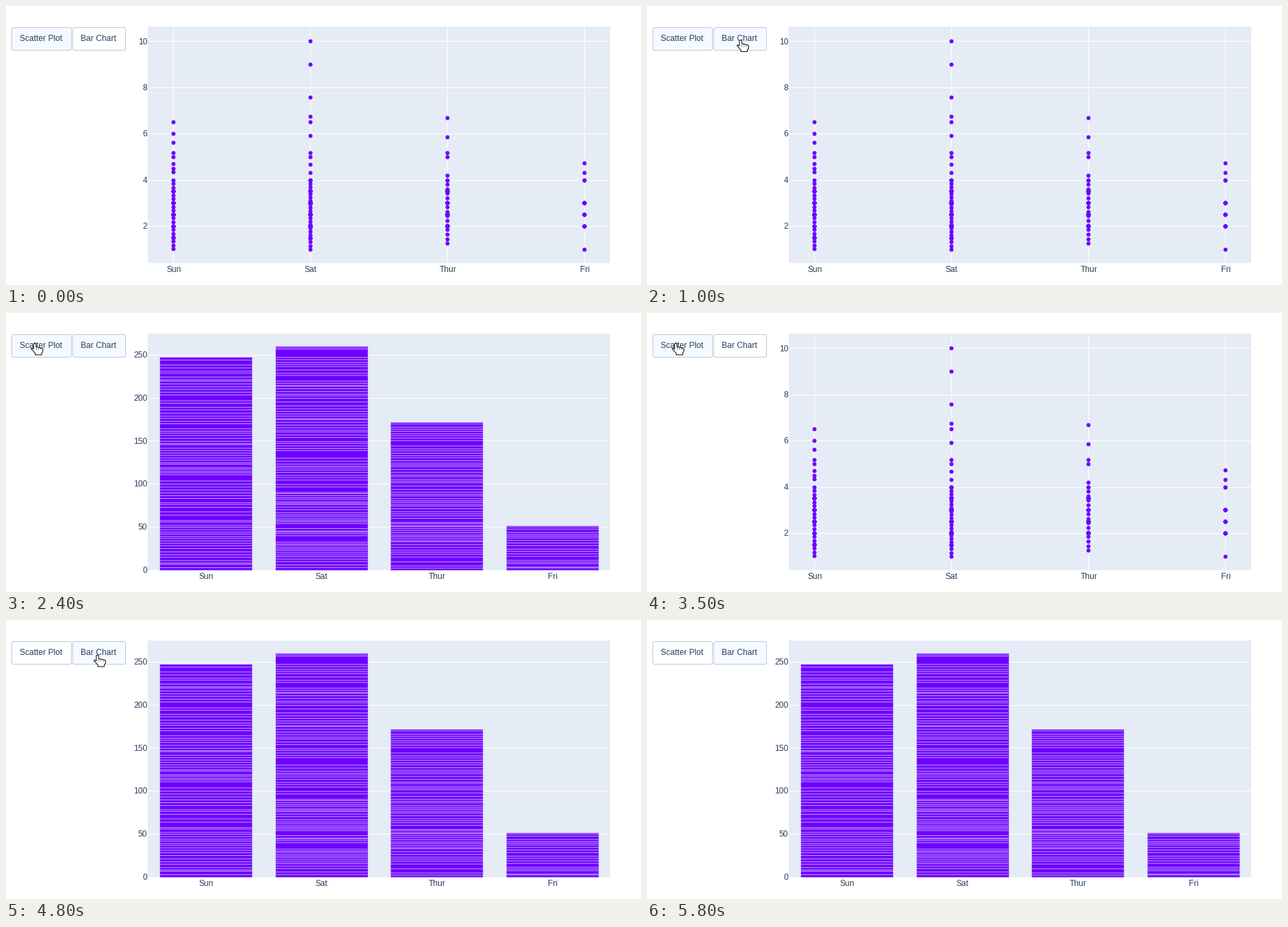
A matplotlib script that plays this animation: 927x407 px, repeating every 6.4 s.

```python
import random

import numpy as np
import matplotlib.pyplot as plt
from matplotlib.animation import FuncAnimation
from matplotlib.patches import FancyBboxPatch, Polygon, Rectangle

W, H, DPI = 927, 407, 100
STEP_MS, STEPS = 100, 64
LEFT, RIGHT, TOP, BOTTOM = 207, 882, 30, 375
INK, PANEL, VIOLET = "#2a3f5f", "#e5ecf6", "#6f00ff"
ACTIVE, BORDER = "#f4faff", "#bec8d9"

# day: (number of tips, their sum, lowest tip, outstanding tips)
DAYS = {
    "Sun": (76, 247.39, 1.01, [6.5, 6, 5.62, 5.17, 5, 4.71, 4.5, 4.34]),
    "Sat": (87, 260.4, 1, [10, 9, 7.58, 6.73, 6.5, 5.92, 5.16, 5, 4.67, 4.3]),
    "Thur": (62, 171.83, 1.25, [6.7, 5.85, 5.17, 5, 4.2]),
    "Fri": (19, 51.96, 1, [4.73, 4.3]),
}

fig = plt.figure(figsize=(W / DPI, H / DPI), dpi=DPI, facecolor="white")
ax = fig.add_axes([0, 0, 1, 1])
ax.set(xlim=(0, W), ylim=(H, 0))
ax.axis("off")


def pt(px):
    return px * 72 / DPI


def label(x, y, text, ha="center"):
    return ax.text(x, y, text, ha=ha, va="baseline", color=INK, zorder=6,
                   fontsize=pt(12), family="Liberation Sans")


def tips_of(day):
    """Outstanding tips, an even spread up to 4, and rounded tips for the rest."""
    count, _, lowest, outstanding = DAYS[day]
    rng = random.Random(day)
    tips = outstanding + list(np.linspace(lowest, 4, count // 4))
    tips += [round(2 * rng.triangular(1.5, 4, 2.5)) / 2 for _ in range(count - len(tips))]
    rng.shuffle(tips)
    return tips


def value_axis(ticks, y_of, xs=()):
    ys = [y_of(v) for v in ticks]
    return [ax.hlines(ys, LEFT, RIGHT, "white", linewidth=pt(1), zorder=2),
            ax.vlines(xs, TOP, BOTTOM, "white", linewidth=pt(1), zorder=2),
            *(label(206.2, y + 4.2, str(v), "right") for v, y in zip(ticks, ys))]


def scatter_chart():
    def y_of(v):
        return 51.3 + (10 - v) * 33.7

    xs = [244.5 + 200 * k for k in range(4)]
    parts = value_axis(range(2, 11, 2), y_of, xs)
    for x, day in zip(xs, DAYS):
        ys = [y_of(v) for v in tips_of(day)]
        parts.append(ax.scatter([x] * len(ys), ys, color=VIOLET, s=pt(6) ** 2,
                                linewidths=0, zorder=4))
        parts.append(label(x + .4, 388, day))
    return parts


def bar_chart():
    def y_of(v):
        return BOTTOM - v * 1.2575

    parts = value_axis(range(0, 251, 50), y_of)
    slot = (RIGHT - LEFT) / len(DAYS)
    for k, (day, (_, total, *_)) in enumerate(DAYS.items()):
        mid, half = LEFT + slot * (k + .5), slot * .4
        tops = np.cumsum(tips_of(day))
        seams = y_of(tops * total / tops[-1])
        parts.append(ax.add_patch(Rectangle((mid - half, y_of(total)), 2 * half,
                                            BOTTOM - y_of(total), fc=VIOLET, ec=PANEL,
                                            lw=pt(.5), zorder=3)))
        parts.append(ax.hlines(seams, mid - half, mid + half, PANEL, alpha=.75,
                               linewidth=pt(.9), zorder=4, snap=False))
        parts.append(label(mid + .4, 388, day))
    return parts


def button(x0, x1, text):
    r = 2.5
    box = FancyBboxPatch((x0 + r, 31.5 + r), x1 - x0 - 2 * r, 33 - 2 * r,
                         boxstyle=f"round,pad={r},rounding_size={r}",
                         ec=BORDER, lw=pt(1), zorder=5)
    label((x0 + x1) / 2 - .7, 51, text)
    return ax.add_patch(box)


ax.add_patch(Rectangle((LEFT, TOP), RIGHT - LEFT, BOTTOM - TOP, fc=PANEL, lw=0))
charts = {"scatter": scatter_chart(), "bar": bar_chart()}
spans = {"scatter": (8.5, 95.5), "bar": (97.5, 174.5)}
buttons = {"scatter": button(*spans["scatter"], "Scatter Plot"),
           "bar": button(*spans["bar"], "Bar Chart")}

# Pointer outlines, relative to the hot spot
HAND = np.array([(-1.7, 1), (0, 0), (1.7, 1), (1.8, 5.4), (5, 6), (8.4, 6.8),
                 (11, 7.6), (12, 9), (11.6, 12.5), (10, 14.5), (10, 17), (.6, 17),
                 (.6, 14.8), (-2.4, 11.2), (-5, 8.8), (-4.6, 7.2), (-1.7, 8.5)])
ARROW = np.array([(0, 0), (0, 15), (3.5, 12), (6, 17.5), (8.3, 16.5), (6, 11), (11, 11)])
KNUCKLES = (1.8, 5, 8.2)

pointer = ax.add_patch(Polygon(HAND, fc="white", ec="#1a1a1a", lw=pt(1.1),
                               joinstyle="round", zorder=9))
creases = [ax.plot([], [], color="#555555", lw=pt(.7), zorder=10)[0] for _ in KNUCKLES]

# Each move runs from where the last one ended: (first step, last step, x, y)
ENTRY, EXIT = 3, 57
MOVES = [(ENTRY, 9, 138, 50.5), (9, 10, 136.5, 49.5), (20, 21, 108, 49.5),
         (22, 24, 42, 44), (35, 41, 133.5, 51), (54, EXIT, 90, 25)]


def hot_spot(step):
    if not ENTRY <= step <= EXIT:
        return None
    spot = np.array([161.0, 6.0])
    for first, last, *goal in MOVES:
        u = np.clip((step - first) / (last - first), 0, 1)
        spot = spot + (np.array(goal) - spot) * u * u * (3 - 2 * u)
    return spot


def hovered_button(spot):
    if spot is None or not 31 <= spot[1] <= 65:
        return None
    return next((name for name, (a, b) in spans.items() if a <= spot[0] <= b), None)


def draw(step):
    shown = "scatter" if step < 20 or 35 <= step < 48 else "bar"
    for name, parts in charts.items():
        for part in parts:
            part.set_visible(name == shown)

    spot = hot_spot(step)
    hovered = hovered_button(spot)
    for name, box in buttons.items():
        box.set_facecolor(ACTIVE if name in (shown, hovered) else "white")

    pointer.set_visible(spot is not None)
    if spot is not None:
        pointer.set_xy((HAND if hovered else ARROW) + spot)
    for crease, dx in zip(creases, KNUCKLES):
        crease.set_visible(hovered is not None)
        if hovered:
            crease.set_data([spot[0] + dx] * 2, [spot[1] + 6, spot[1] + 9])
    return []


anim = FuncAnimation(fig, draw, frames=STEPS, interval=STEP_MS, repeat=True,
                     repeat_delay=0, blit=False)
plt.show()
```
